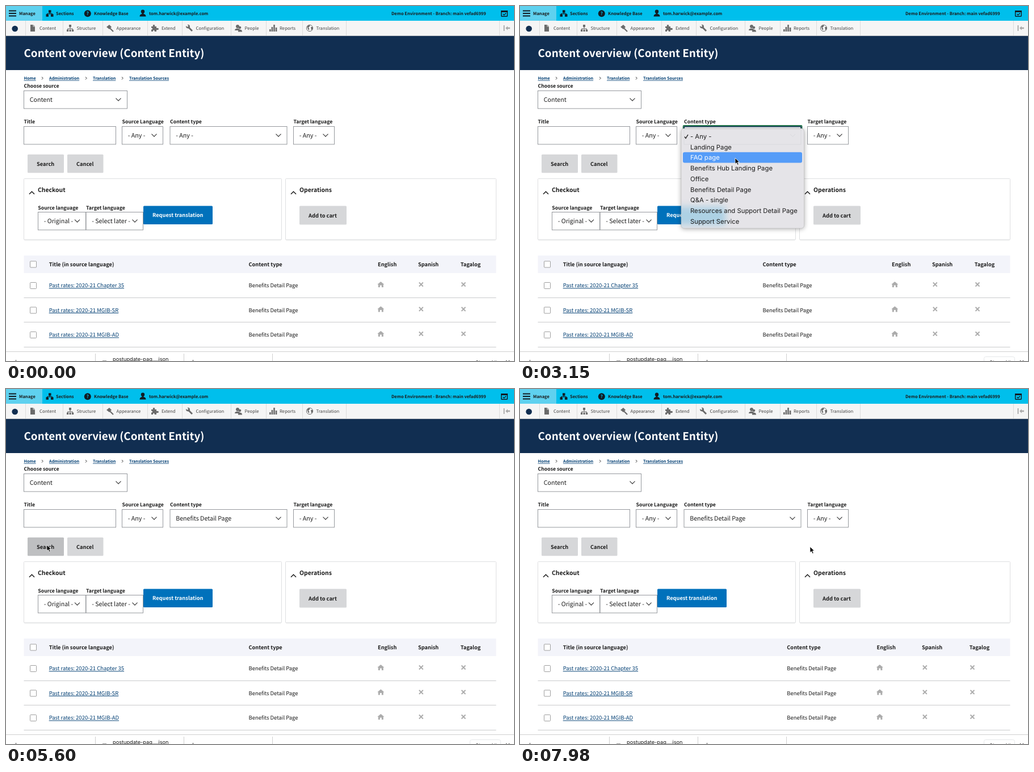
Write an HTML page that moves like this. It is 895 by 626 pixels and loops after 8 s.

```html
<!DOCTYPE html>
<html lang="en">
<head>
<meta charset="utf-8">
<title>Content overview</title>
<style>
  html, body { margin: 0; width: 100%; height: 100%; overflow: hidden; background: #fff; }
  svg { display: block; width: 895px; height: 626px; }
  text {
    font-family: 'Noto Sans CJK JP', 'Noto Sans CJK SC', 'Noto Sans CJK KR', 'Noto Sans', sans-serif;
    fill: #1b1b1b; white-space: pre; text-rendering: geometricPrecision;
  }
  .b { font-weight: 700; }
  .link { fill: #003e73; text-decoration: underline; text-decoration-thickness: .8px; }
  .sys { font-family: Inter, 'Liberation Sans', sans-serif; }
</style>
</head>
<body>
<svg id="stage" viewBox="0 0 895 626" xmlns="http://www.w3.org/2000/svg"></svg>
<script>
const LOOP = 8000;
const stage = document.getElementById('stage');

// Markup helpers
const text = (x, y, size, str, cls = '', extra = '') =>
  `<text x="${x}" y="${y}" font-size="${size}" class="${cls}" ${extra}>${str}</text>`;
const rect = (x, y, w, h, fill, extra = '') =>
  `<rect x="${x}" y="${y}" width="${w}" height="${h}" fill="${fill}" ${extra}/>`;
const path = (d, fill = 'none', extra = '') => `<path d="${d}" fill="${fill}" ${extra}/>`;
const line = (d, color, width = 1) => path(d, 'none', `stroke="${color}" stroke-width="${width}"`);
const at = (x, y, body) => `<g transform="translate(${x} ${y})">${body}</g>`;
const label = (x, y, str) => text(x, y, 8.72, str, 'b');
const chevron = (x, y) => line(`M${x - 4.5} ${y - 2.3}l4.5 4.5l4.5-4.5`, '#333', 1.1);
const field = (x, y, w, h) => rect(x + .5, y + .5, w - 1, h - 1, '#fff', 'stroke="#8b8e93" stroke-width=".9"');
const select = (x, y, w, str, arrowX, id = '') =>
  field(x, y, w, 32.4) + text(x + 10.7, y + 20.2, 10.65, str, '', id && `id="${id}"`) + chevron(arrowX, y + 16);
const button = (x, y, w, h, str, textX, fill = '#d6d7d9', color = '#1b1b1b', id = '') =>
  rect(x, y, w, h, fill, `rx="1.5" ${id && `id="${id}"`}`) +
  text(textX, y + h / 2 + 3.6, 9.27, str, 'b', `style="fill:${color}"`);
const checkbox = (x, y) => rect(x - 5.5, y - 5.5, 11, 11, '#fff', 'rx="1" stroke="#949494" stroke-width=".9"');

function topBar() {
  const ink = '#111c24';
  const boxes = [[4.5, 0], [0, 7], [8.5, 7]].map(([x, y]) => rect(x, y, 4.5, 4.5, ink)).join('');
  const person = `<circle cx="5.5" cy="3.3" r="3.2" fill="${ink}"/>` + path('M0 12q0-4 4-4.5v-2h3v2q4 .5 4 4.5z', ink);
  const calendar = rect(.7, 1.7, 10.6, 9.6, 'none', `stroke="${ink}" stroke-width="1.4" rx="1"`) +
    rect(0, 1, 12, 3, ink) + line('M3.5 7l2 2l3.5-3.5', ink, 1.2);
  const word = (x, str, id = '') => text(x, 16.2, 7.5, str, 'b', id && `id="${id}"`);
  return rect(0, 0, 895, 26, '#00bfec') + rect(0, 0, 64, 26, '#5fd1ef') +
    line('M5 8.5h13M5 13h13M5 17.5h13', ink, 2.2) + word(23, 'Manage', 'manage') +
    at(70.5, 7.3, boxes + line('M6.7 4v4M2.2 8v-2h8.6v2', ink)) + word(88, 'Sections') +
    `<circle cx="143.8" cy="13.2" r="6" fill="${ink}"/>` +
    text(141.7, 16.4, 8, '?', 'b', 'style="fill:#00bfec"') + word(155, 'Knowledge Base') +
    at(235.5, 6.5, person) + word(252, 'tom.harwick@example.com', 'account') +
    word(679, 'Demo Environment - Branch: main vefad6999') + at(872, 7, calendar);
}

function tabBar() {
  const gray = '#6b6b6b';
  const icons = {
    page: path('M1 0h5l3 3v9h-8z', gray) + line('M6 0v3h3', '#f6f6f3', .8),
    tree: line('M6 3v4M2 9v-2h8v2', gray, 1.2) + rect(4, 0, 4, 4, gray) +
      [0, 4.5, 9].map(x => rect(x, 8.5, 3.2, 3.5, gray)).join(''),
    brush: path('M0 4l5-4l4 4l-4 4z', gray) + line('M6 6l6 6', gray, 2.2),
    puzzle: path('M0 3h3q-1-3 1.5-3t1.5 3h3v3q4-1 4 1.5t-4 1.5v3h-3.2q0-2.5-1.5-2.5t-1.5 2.5h-2.8v-3.5q2.2 0 2.2-1.5t-2.2-1.5z', gray),
    wrench: line('M4 4l7 7', gray, 2.8) + path('M0 2l2.5 2l2-2l-2-2q4-.8 4.5 3t-3.5 3.5t-3.5-4.5z', gray),
    people: `<circle cx="5" cy="3" r="3" fill="${gray}"/><circle cx="9" cy="5" r="2.3" fill="${gray}"/>` +
      path('M0 10q0-3.5 5-3.5q3 0 4 2q4 0 4 4h-7v-2.5z', gray),
    bars: [[0, 8], [3.6, 4], [7.2, 0], [10.8, 5]].map(([x, y]) => rect(x, y, 2.6, 12 - y, gray)).join(''),
    globe: `<circle cx="6" cy="6" r="5.6" fill="#fff" stroke="${gray}"/>` +
      path('M1.5 3q3-3 5-2l-1 3l-2 1l2 2l-1 3l-2-3zM8 4l3 0l0 4l-2 2z', gray),
  };
  const tabs = [
    [34, 42, 'page', 59, 'Content'], [100, 107, 'tree', 124.5, 'Structure'],
    [170, 177, 'brush', 194.5, 'Appearance'], [249, 256, 'puzzle', 274, 'Extend'],
    [310, 317, 'wrench', 334.5, 'Configuration'], [396, 403, 'people', 420.5, 'People'],
    [458, 464, 'bars', 482, 'Reports'], [522, 529, 'globe', 546.5, 'Translation'],
  ];
  return rect(0, 26, 895, 27, '#f5f5f5') + line('M0 52.5h895', '#a9aeb4', .8) +
    '<circle cx="15.7" cy="40" r="5.3" fill="#112e51"/>' +
    tabs.map(([edge, x, icon, tx, name]) => line(`M${edge + .5} 26v26`, '#dcdcdc') +
      at(x, 33, icons[icon]) + text(tx, 42.3, 7.75, name, '', 'style="fill:#444"')).join('') +
    line('M599.5 26v26M869.5 26v26', '#dcdcdc') +
    line('M877.5 34v10', '#999', 1.5) + line('M881 39h7', '#aaa', 2.6) + path('M880 39l4-3.5v7z', '#aaa');
}

function header() {
  const crumbs = [[31.5, 'Home'], [76, 'Administration'], [153, 'Translation'], [217, 'Translation Sources']];
  return rect(0, 53, 895, 60, '#112e51') +
    text(31.5, 90.3, 18.84, 'Content overview (Content Entity)', 'b', 'style="fill:#fff"') +
    crumbs.map(([x, str]) => text(x, 130, 7.23, str, 'b link')).join('') +
    [64, 141, 205].map(x => line(`M${x - 1} 125l2.2 2.3l-2.2 2.3`, '#333')).join('');
}

function filters() {
  return label(31.5, 144, 'Choose source') + select(31, 149, 183, 'Content', 198) +
    label(31.5, 207, 'Title') + field(31, 212, 163, 32.4) +
    label(204.5, 207, 'Source Language') + select(204, 212, 73, '- Any -', 261) +
    label(289, 207, 'Content type') + select(288.5, 212, 207, '- Any -', 480, 'typeValue') +
    rect(289.2, 212.7, 205.8, 30.8, 'none', 'id="focus" stroke="#16385f" stroke-width="1.8" rx="1"') +
    rect(287.7, 211, 208.8, 34, 'none', 'id="openRing" stroke="#23784c" stroke-width="1.8" rx="1"') +
    label(506.5, 207, 'Target language') + select(506, 212, 73, '- Any -', 563) +
    button(38, 261.7, 64, 32.6, 'Search', 54, '#d6d7d9', '#1b1b1b', 'search') +
    button(108, 261.7, 63.5, 32.6, 'Cancel', 124);
}

function panels() {
  const panel = (x, w, title) =>
    rect(x + .5, 306, w, 107.5, '#000', 'rx="2" opacity=".08"') +
    rect(x + .5, 304.5, w, 107.5, '#fff', 'rx="1" stroke="#dedfe1"') +
    line(`M${x + 10} 331.8l4.5-4.5l4.5 4.5`, '#1b1b1b', 1.5) + text(x + 25, 327.5, 10.42, title, 'b');
  return panel(31, 454, 'Checkout') + panel(492, 371, 'Operations') +
    label(56.3, 358.7, 'Source language') + select(56, 363, 85, '- Original -', 125.5) +
    label(141, 358.7, 'Target language') + select(140.5, 363, 101.5, '- Select later -', 227) +
    button(242, 352.6, 122, 32.5, 'Request translation', 258, '#0071bb', '#fff') +
    button(517, 352.6, 83, 33, 'Add to cart', 533);
}

function table(id, typeX, langs) {
  const head = (x, str) => text(x, 459, 9.24, str, 'b');
  const house = path('M0-5l6 5h-1.5v5h-3v-3.5h-3v3.5h-3v-5h-1.5z', '#acacac');
  const cross = line('M-3.5-3.5l7 7M3.5-3.5l-7 7', '#acacac', 1.9);
  const rows = ['Chapter 35', 'MGIB-SR', 'MGIB-AD'].map((name, i) => {
    const y = 493 + i * 43.5;
    return checkbox(48, y) + text(75.7, y + 3.4, 9.5, 'Past rates: 2020-21 ' + name, 'link') +
      text(typeX, y + 3.4, 9.45, 'Benefits Detail Page') +
      langs.map((x, k) => at(x + 5.3, y - 2, k ? cross : house)).join('') +
      line(`M31.5 ${Math.floor(y + 21) + .5}h832`, '#c9cacc');
  });
  return `<g id="${id}">` + rect(31.5, 440, 832, 31, '#f3f4fa') + checkbox(48, 455.5) +
    head(75.7, 'Title (in source language)') + head(typeX, 'Content type') +
    ['English', 'Spanish', 'Tagalog'].map((str, k) => head(langs[k], str)).join('') + rows.join('') + '</g>';
}

function downloads() {
  const file = (x, y, str) => text(x, y, 9.2, str, 'sys');
  return rect(0, 609, 895, 17, '#fff') + line('M0 609.5h895', '#cfcfcf') +
    line('M157.5 613v13M313.5 613v13M469.5 613v13', '#cfcfcf') +
    line('M17.5 624v2M329.5 624v2', '#777', 1.5) + line('M170 625.5h7', '#999') +
    file(30, 632.5, 'postupdate-list.html') + file(188, 625.5, 'postupdate-paq....json') +
    file(345, 632.5, 'postupdate-list.html') +
    rect(817.5, 618.5, 54, 20, '#fff', 'id="showBox" rx="3" stroke="#e6e8ea"') +
    file(827, 631.5, 'Show All') + line('M881 625l6 6M887 625l-6 6', '#555', 1.3);
}

const ROW = 18.75;
const ITEMS = ['- Any -', 'Landing Page', 'FAQ page', 'Benefits Hub Landing Page', 'Office',
  'Benefits Detail Page', 'Q&amp;A - single', 'Resources and Support Detail Page', 'Support Service'];

function menu() {
  return '<g id="menu">' +
    rect(284, 217, 216.5, 176, '#000', 'rx="5" opacity=".35" filter="url(#shadow)"') +
    rect(284, 216, 216.5, 176, '#e5e4e8', 'rx="5"') +
    '<g clip-path="url(#menuClip)">' + rect(270, 354, 92, 32, '#8fc6e2', 'opacity=".65" filter="url(#haze)"') + '</g>' +
    rect(289, 217, 206, 27, 'none', 'stroke="#d9d9dd"') + line('M476 226l4.5 4.5l4.5-4.5', '#d9d9dd') +
    rect(284, 216, 216.5, 176, 'none', 'rx="5" stroke="#bbb" stroke-width=".6"') +
    rect(287, 0, 210, ROW, '#559cf8', 'id="highlight" rx="3"') +
    line('M290 230.5l2 2.8l4-6.5', '#1b1b1b', 1.3) +
    ITEMS.map((str, i) => text(300, 233.9 + i * ROW, 11.3, str, 'sys item')).join('') + '</g>';
}

function pointer() {
  const arrow = path('M0 0v10.5l2.5-2.2l1.8 4l1.9-.8l-1.8-3.9h3.3z', '#000', 'stroke="#fff" stroke-width=".8"');
  const hand = path('M-1 0q1.6-1 2 .6l.7 3l4 1q1.5.5 1.2 2l-.9 4.4h-5l-3.3-4q-.3-1.5 1.5-.8l.8.6z',
    '#fff', 'stroke="#000" stroke-width=".9" stroke-linejoin="round"');
  return '<circle id="ring" fill="none" stroke="#111" stroke-width="1.2"/>' +
    `<g id="cursor"><g id="arrow">${arrow}</g><g id="hand">${hand}</g></g>`;
}

stage.innerHTML =
  '<defs><filter id="shadow" x="-20%" y="-20%" width="140%" height="140%"><feGaussianBlur stdDeviation="4"/></filter>' +
  '<filter id="haze" x="-30%" y="-50%" width="160%" height="200%"><feGaussianBlur stdDeviation="6"/></filter>' +
  `<clipPath id="menuClip">${rect(284, 216, 216.5, 176, '#fff', 'rx="5"')}</clipPath></defs>` +
  rect(0, 0, 895, 626, '#fff') + topBar() + tabBar() + header() + filters() + panels() +
  table('tableBefore', 427.5, [655, 726, 800.7]) + table('tableAfter', 470.3, [628.5, 708, 791.7]) +
  downloads() + menu() + pointer();

const $ = id => document.getElementById(id);
const items = [...document.querySelectorAll('.item')];
const show = (id, on) => { $(id).style.display = on ? '' : 'none'; };

// Pointer stops: time, x, y
const STOPS = [
  [490, 803, 610], [700, 803, 282], [910, 803, 282], [1050, 640, 187], [1120, 608, 204], [1330, 608, 204],
  [1680, 337, 230], [2030, 341, 231], [2310, 341, 231], [2400, 386, 222], [2940, 386, 222], [3150, 379, 268],
  [3400, 378, 320], [3640, 378, 361], [3780, 378, 357], [4100, 376, 323], [4300, 376, 323],
  [4550, 84, 274], [4690, 72, 275], [7400, 72, 275], [7630, 420, 288], [7770, 420, 288], [7980, 511, 278],
];

function pointerAt(t) {
  const next = STOPS.findIndex(stop => stop[0] > t);
  if (next < 0) return STOPS[STOPS.length - 1].slice(1);
  const [t0, x0, y0] = STOPS[Math.max(0, next - 1)], [t1, x1, y1] = STOPS[next];
  const p = Math.min(1, Math.max(0, (t - t0) / (t1 - t0)));
  const k = p * p * (3 - 2 * p);
  return [x0 + (x1 - x0) * k, y0 + (y1 - y0) * k];
}

function render(now) {
  const t = Math.floor(now % LOOP / 70) * 70;
  const within = (a, b) => t >= a && t < b;
  const [x, y] = pointerAt(t);

  show('cursor', t >= 560);
  $('cursor').setAttribute('transform', `translate(${x} ${y})`);
  const handOn = within(5740, 7420);
  show('hand', handOn);
  show('arrow', !handOn);

  const fading = within(4900, 4970);
  show('ring', within(2380, 2520) || within(4690, 4970));
  $('ring').setAttribute('cx', x);
  $('ring').setAttribute('cy', y);
  $('ring').setAttribute('r', fading ? 21 : 14.5);
  $('ring').setAttribute('opacity', fading ? .4 : 1);

  const open = within(2520, 4340);
  const active = within(4200, 4270) ? -1 : Math.max(0, Math.floor((y - 220.4) / ROW));
  show('menu', open);
  show('openRing', open);
  show('focus', within(2380, 4690));
  show('highlight', active >= 0);
  $('highlight').setAttribute('y', 220.3 + Math.max(0, active) * ROW);
  items.forEach((el, i) => { el.style.fill = i === active ? '#fff' : '#1b1b1b'; });

  $('typeValue').textContent = t >= 4270 ? 'Benefits Detail Page' : '- Any -';
  $('search').setAttribute('fill', within(4550, 7420) ? '#bebfc1' : '#d6d7d9');
  show('showBox', t >= 1820);
  show('tableBefore', t < 5740);
  show('tableAfter', t >= 5740);
  const loading = within(5740, 5950);
  for (const id of ['manage', 'account']) $(id).style.fill = loading ? '#fff' : '';
}

const start = performance.now();
function tick() {
  render(performance.now() - start);
  requestAnimationFrame(tick);
}
tick();
</script>
</body>
</html>
```
